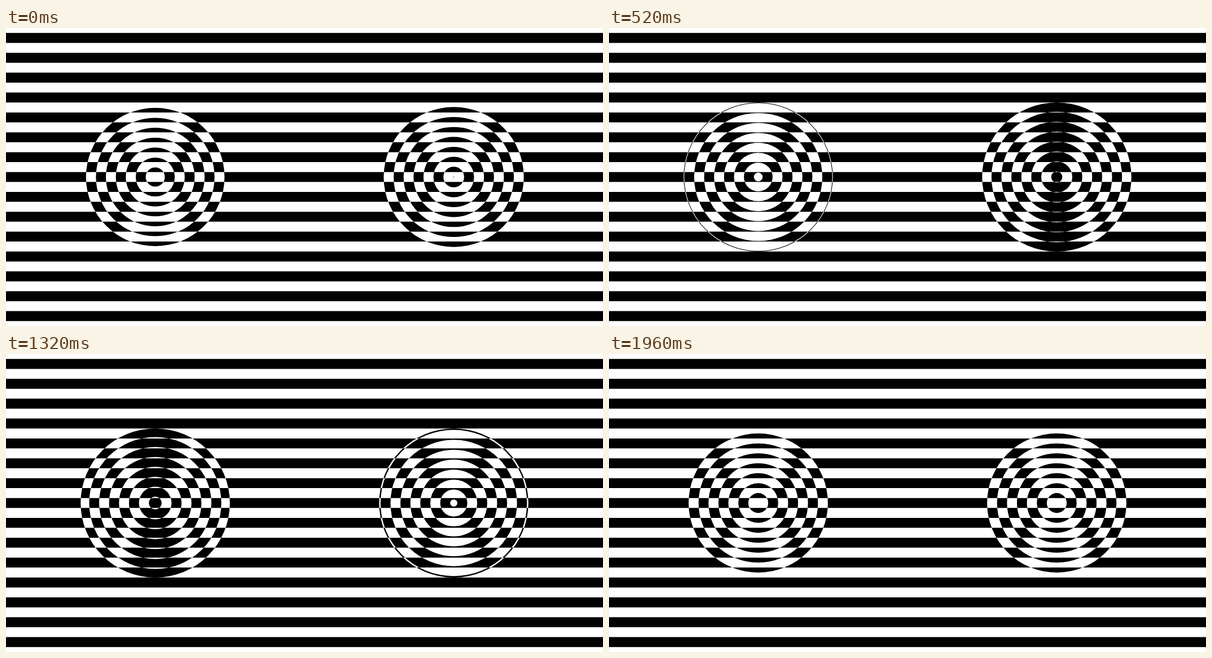
Animation, 1058 px wide and 529 px high, one loop 2000 ms. Source, as an HTML page with a canvas:

```html
<!DOCTYPE html>
<html lang="en">
<head>
<meta charset="utf-8">
<title>Rings on stripes</title>
<style>
  html, body { margin: 0; width: 100%; height: 100%; overflow: hidden; background: #fff; }
  canvas { display: block; }
</style>
</head>
<body>
<canvas id="stage" width="1058" height="529"></canvas>
<script>
const WIDTH = 1058, HEIGHT = 529;
const BAND = HEIGHT / 30;   // thickness of a stripe and of a ring
const EDGE = 7.5;           // outer radius of the ring areas, in bands
const LOOP = 2000, STEP = 40;
const ctx = document.getElementById('stage').getContext('2d');

function addCircle(path, x, radius) {
  path.moveTo(x + radius, HEIGHT / 2);
  path.arc(x, HEIGHT / 2, radius, 0, 2 * Math.PI);
}

// Bands between integer values of (radius + shift) alternate; even ones invert the stripes.
function addRings(path, x, shift) {
  for (let k = Math.floor(shift) + 1; k - shift < EDGE; k++) {
    if (k - shift > 1e-6) addCircle(path, x, (k - shift) * BAND);
  }
  if (Math.floor(EDGE + shift) % 2 === 0) addCircle(path, x, EDGE * BAND);
}

function draw(time) {
  const frame = Math.floor((time % LOOP) / STEP);
  const frames = LOOP / STEP;
  const shift = 2 * ((frame + 1) % frames) / frames;
  const path = new Path2D();
  for (let i = 0; i < 15; i++) path.rect(0, (2 * i + 0.5) * BAND, WIDTH, BAND);
  addRings(path, WIDTH / 4, shift);        // shrinking
  addRings(path, WIDTH * 3 / 4, -shift);   // growing
  ctx.fillStyle = '#fff';
  ctx.fillRect(0, 0, WIDTH, HEIGHT);
  ctx.fillStyle = '#000';
  ctx.fill(path, 'evenodd');
}

function tick() {
  draw(performance.now());
  requestAnimationFrame(tick);
}
tick();
</script>
</body>
</html>
```
